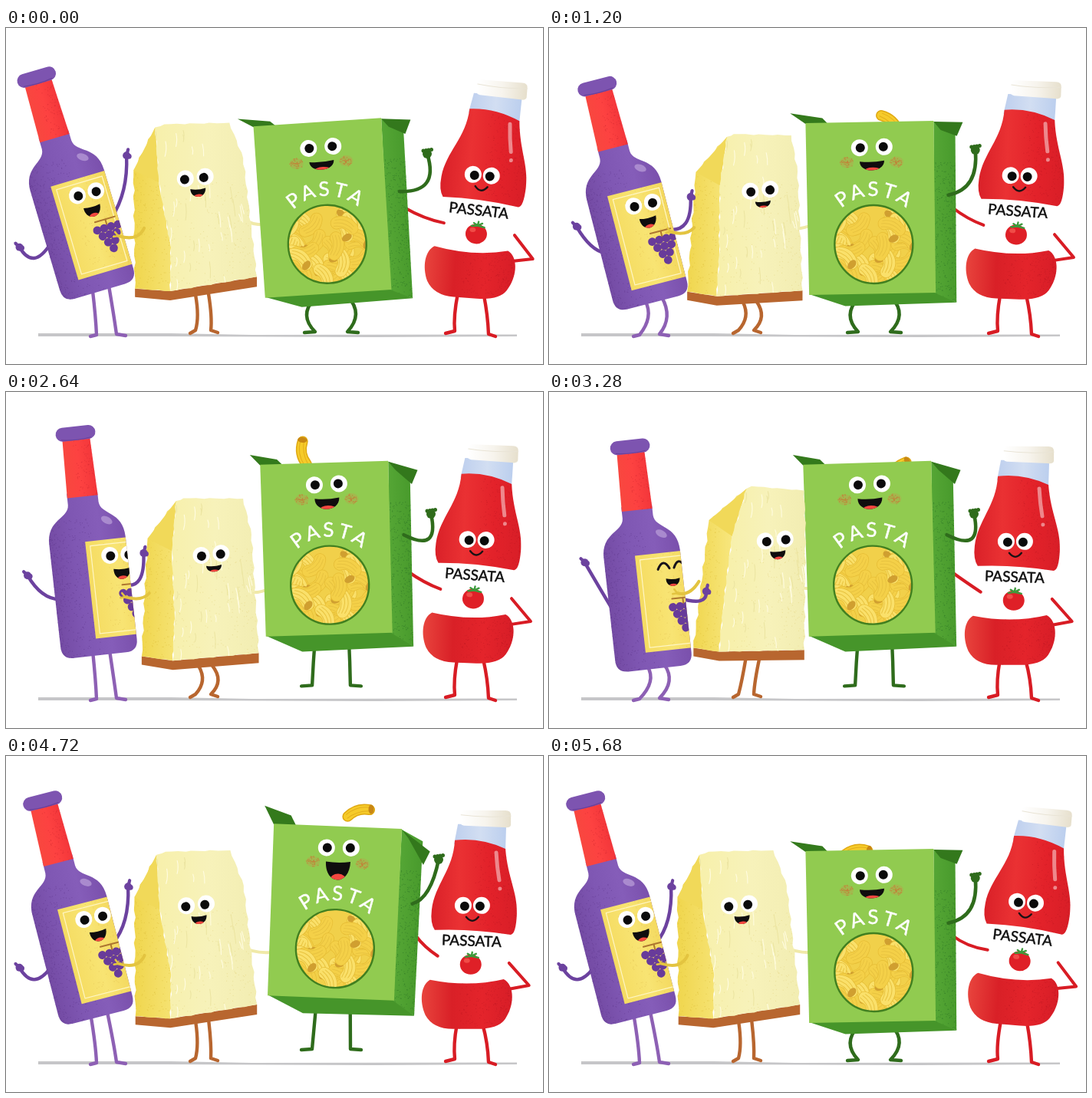
Write an HTML page with a canvas that moves like this. It is 700 by 438 pixels and loops after 5760 ms.

```html
<!DOCTYPE html>
<html lang="en">
<head>
<meta charset="utf-8">
<title>Dancing groceries</title>
<style>
html, body { margin: 0; width: 100%; height: 100%; overflow: hidden; background: #fff; }
canvas { display: block; width: 700px; height: 438px; }
</style>
</head>
<body>
<canvas id="stage" width="700" height="438"></canvas>
<script>
const ctx = document.getElementById('stage').getContext('2d');
const STEP = 80, STEPS = 72;

const rad = d => d * Math.PI / 180;
const lerp = (a, b, t) => a + (b - a) * t;
const clamp = t => Math.max(0, Math.min(1, t));
const smooth = t => t * t * (3 - 2 * t);
// Swings between -1 and 1, reaching 1 at step `peak`
const wave = (step, period, peak) => Math.cos(2 * Math.PI * (step - peak) / period);

function bottlePose(step) {
  const drift = wave(step, 12, 4.5), left = wave(step, 12, .5), right = wave(step, 12, -.2);
  const lean = ((1 - wave(step, 12, 1)) / 2) ** 1.3;
  return {
    x: 129 + 9 * drift,
    y: 350.5 + 10.5 * drift,
    tilt: -17 + 15.5 * lean,
    label: -13 - 14 * wave(step, 12, 1.5),
    laughing: wave(step, 12, 6.5) > .6,
    leftHand: [26 + 15 * wave(step, 12, 5.5), 242 + 38 * left],
    rightHand: [183 - 25 * right, 205 - 49 * right]
  };
}
function cheesePose(step) {
  return { sway: (1 - wave(step, 12, -.3)) / 2, dip: (1 + wave(step, 6, 2.4)) / 2 };
}
function boxPose(step) {
  const p = step % 8;
  const lift = 1 - smooth(clamp((Math.abs(p - 3.2) - 2.1) / 1.1));
  const tilt = p < 3 ? lerp(-3.4, 2.6, p / 3) : lerp(2.6, -.7, (p - 3) / 4);
  const x = 421.5 + 2.5 * tilt, handY = 147 + 17 * wave(p, 8, 0);
  return {
    x, y: 235 - 31 * lift, tilt, lift,
    mouth: 18 + 7 * wave(p, 8, 3.7),
    leftFlap: -130 - 7 * wave(p, 8, 4),
    rightFlap: -80 + 13 * wave(p, 8, 3.2),
    hand: [x + 136, handY],
    elbow: [557 + 9 * wave(p, 8, .5), handY + 51]
  };
}
function saucePose(step) {
  return {
    x: 602 + 2.2 * wave(step, 9, 8.2),
    y: 324.4 - 3.8 * wave(step, 9, 7.8),
    tilt: 1.9 + 2.9 * wave(step, 9, 8.2)
  };
}

function random(seed) {
  return () => (seed = (seed * 16807) % 2147483647) / 2147483647;
}
function place(x, y, deg, draw) {
  ctx.save();
  ctx.translate(x, y);
  ctx.rotate(rad(deg));
  draw();
  ctx.restore();
}
// Stage position of a point inside a tilted figure
function locate(p, x, y) {
  const c = Math.cos(rad(p.tilt)), s = Math.sin(rad(p.tilt));
  return [p.x + x * c - y * s, p.y + x * s + y * c];
}
function poly(points) {
  const path = new Path2D();
  points.forEach(p => path.lineTo(p[0], p[1]));
  path.closePath();
  return path;
}
function fill(path, color) { ctx.fillStyle = color; ctx.fill(path); }
function dot(x, y, r, color, ry = r, turn = 0) {
  ctx.fillStyle = color;
  ctx.beginPath();
  ctx.ellipse(x, y, r, ry, turn, 0, 7);
  ctx.fill();
}
function line(color, width, d) {
  ctx.strokeStyle = color;
  ctx.lineWidth = width;
  ctx.lineCap = ctx.lineJoin = 'round';
  ctx.stroke(new Path2D(d));
}
const bow = (a, c, b) => `M${a} Q${c} ${b}`;
function across(x0, x1, ...colors) {
  const g = ctx.createLinearGradient(x0, 0, x1, 0);
  colors.forEach((c, i) => g.addColorStop(i / (colors.length - 1), c));
  return g;
}
function inside(path, draw) {
  ctx.save();
  ctx.clip(path);
  draw();
  ctx.restore();
}
// Speckled shading, densest at x0
function grain(path, color, x0, x1, y0, y1, count) {
  const rnd = random(77);
  inside(path, () => {
    ctx.fillStyle = color;
    for (let i = 0; i < count; i++) {
      ctx.fillRect(lerp(x0, x1, rnd() ** 2), lerp(y0, y1, rnd()), 1, 1);
    }
  });
}
function eye(x, y, dx = 0, dy = 0) {
  dot(x, y, 11, '#fff');
  dot(x + dx, y + dy, 6, '#0b0b0b');
}
function mouth(x, y, w, h, deg = 0) {
  place(x, y, deg, () => {
    const r = w / 2;
    const path = new Path2D(`M${-r} 0 Q0 2 ${r} -1 C${r} ${h * 1.3} ${-r} ${h * 1.3} ${-r} 0Z`);
    fill(path, '#0f0d0e');
    inside(path, () => dot(1, h, w * .34, '#f4473f', h * .36));
  });
}
function leg(color, hip, knee, ankle, toe) {
  line(color, 4.4, `${bow(hip, knee, ankle)} L${toe}`);
}
function lettering(text, size, color, x, y) {
  ctx.font = `${size}px Lato, sans-serif`;
  ctx.textAlign = 'center';
  ctx.textBaseline = 'middle';
  ctx.fillStyle = ctx.strokeStyle = color;
  ctx.lineWidth = .5;
  ctx.fillText(text, x, y);
  ctx.strokeText(text, x, y);
}

function drawGround() {
  fill(new Path2D('M42 398 L215 398 L320 400 L666 399.5 V402 L480 403 L210 402 L42 402Z'), '#c6c6c8');
}

function drawSauce(p, box) {
  const red = '#d81c24';
  const at = (x, y) => locate(p, x - 600, y - 327);
  line(red, 4, bow([box.x + 106, 234], [545, 249], at(562, 262)));
  leg(red, at(587, 352), [583, 376], [585, 395], [573, 398]);
  leg(red, at(621, 352), [628, 374], [629, 399], [638, 402]);
  line(red, 4, `M${at(655, 271)} L${at(681, 300)} L${at(654, 305)}`);

  place(p.x, p.y, p.tilt, () => {
    ctx.translate(-600, -327);
    fill(new Path2D('M588 90 H651 L650 124 L583 116Z'), across(585, 650, '#bfd0ee', '#d2def2', '#bccfee'));
    const body = new Path2D('M584 111 Q617 107 650 122 C653 160 666 178 665 207 Q664 233 657 234 ' +
      'Q606 226 558 228 Q552 219 554 202 C558 168 582 150 584 111Z');
    fill(body, across(552, 666, '#d92028', '#ea3133', '#e3222a', '#d81e27'));
    grain(body, '#a9142055', 666, 610, 115, 235, 350);
    const base = new Path2D('M552 293 Q603 303 648 292 C662 299 663 325 650 344 Q641 357 612 357 H582 ' +
      'Q556 357 546 339 C538 321 540 300 552 293Z');
    fill(base, across(541, 660, '#e8443d', '#d92027', '#e4242b', '#d71d27'));
    grain(base, '#a9142055', 660, 590, 295, 357, 280);
    line('#ffffff77', 5, 'M638 127 Q639 146 642 163');
    dot(643, 174, 2.5, '#ffffff77');
    const cap = new Path2D('M591 76 Q592 72 598 72 L650 72 Q657 72 657 78 V91 Q656 95 649 94 ' +
      'L596 92 Q590 91 591 86Z');
    fill(cap, across(592, 657, '#ffffff', '#f7f4ed', '#e6dfcc'));
    line('#e9e4d6', 1, 'M592 78 Q625 82 657 79');
    eye(595, 196, 2, 1);
    eye(619, 196, -2, 1);
    line('#181214', 2.4, 'M599 211 Q607 221 615 211');
    place(606, 243, 2, () => lettering('PASSATA', 19, '#111', 0, 0));
    dot(605, 273, 14, '#df2027', 13);
    dot(600, 268, 4, '#f04c47', 3);
    line('#3c9a3c', 2.4, 'M598 263 L606 262 L615 264 M601 259 L606 262 L612 259 M606 262 L607 257');
  });
}

// One piece pops out per jump, alternating between the left and right of the box
function drawToss(step) {
  const p = step % 8, left = step % 16 < 8;
  if (!p) return;
  const x = left ? 384 + 2.3 * p : 459 - (p - 3.4) ** 2;
  const y = left ? 58 + 4.5 * (p - 3.2) ** 2 : 70 + 4.5 * (p - 3.6) ** 2;
  place(x, y, 15 * p - (left ? 115 : 62), () => {
    const arc = 'M-15 3 Q0 -5 15 3';
    line('#dfa812', 14, arc);
    line('#f6cb2a', 11, arc);
    line('#e3ad1c', 1, 'M-16 0 Q0 -7 16 0 M-16 5 Q0 -1 16 5');
    dot(17, 3, 3.5, '#c88714', 6, .3);
  });
}

function drawWindow() {
  const path = new Path2D();
  path.arc(3, 47, 51, 0, 7);
  fill(path, '#f1d04a');
  const rnd = random(41);
  inside(path, () => {
    for (let i = 0; i < 42; i++) {
      place(-48 + rnd() * 102, -4 + rnd() * 102, rnd() * 180, () => {
        line('#e6bd35', 16, 'M-10 2 Q0 -6 12 2');
        line(i % 2 ? '#fae06a' : '#f4d048', 14.5, 'M-10 2 Q0 -6 12 2');
        line('#e8c340', 1, 'M-13 -1 Q0 -9 13 -1 M-13 3 Q0 -4 13 3 M-12 7 Q0 1 13 7');
        if (i % 3 == 0) dot(13, 3, 4.5, '#d09f30', 7);
      });
    }
  });
  ctx.strokeStyle = '#417f20';
  ctx.lineWidth = 2.4;
  ctx.stroke(path);
}

function drawBox(p) {
  const dark = '#2f6c1c', low = 6 * p.lift;
  for (const side of [-1, 1]) {
    const hip = locate(p, side < 0 ? -18 : 26, 117);
    const ankle = [424 + side * (21 + 4 * p.lift), 396 - 14 * p.lift];
    const knee = [(hip[0] + ankle[0]) / 2 + side * 21 * (1 - p.lift), (hip[1] + ankle[1]) / 2];
    leg(dark, hip, knee, ankle, [ankle[0] + side * 14, ankle[1] + 1]);
  }
  place(p.x, p.y, p.tilt, () => {
    const tip = p.leftFlap;
    fill(poly([[-84, -111], [-104 + 7 * p.lift, tip], [-62, -110 + (tip + 110) * .55], [-55, -111]]), '#347a1c');
    const under = poly([[-82, 111], [-35, 127 + low], [110, 124 + low], [83, 109]]);
    fill(under, '#46952a');
    const side = poly([[83, -112], [111, -98], [110, 124 + low], [81, 111]]);
    fill(side, across(82, 112, '#55a635', '#489a2c'));
    grain(side, '#2e7526aa', 113, 82, -60, 130, 500);
    fill(poly([[83, -112], [121, p.rightFlap - 18], [113, p.rightFlap], [92, -101]]), '#33781c');
    fill(poly([[-84, -112], [83, -113], [83, 111], [-82, 112]]), '#91cb50');
    const rnd = random(9), up = 5 * p.lift;
    for (const x of [-31, 34]) {
      dot(x, -60 - up, 9, '#c6964c55', 7);
      for (let i = 0; i < 45; i++) {
        const a = rnd() * 7, r = rnd() * 9;
        dot(x + r * Math.cos(a), -60 - up + r * Math.sin(a) * .8, .7, '#c0853a');
      }
    }
    eye(-14, -79 - up, 1, 0);
    eye(18, -80 - up, -1, 0);
    mouth(2, -61 - up, 32, p.mouth);
    drawWindow();
    [...'PASTA'].forEach((letter, i) =>
      place(3, 47, (i - 2) * 17.2, () => lettering(letter, 26, '#fff', 0, -71)));
  });
  const [x, y] = p.hand;
  line(dark, 4.6, bow(locate(p, 101, -16), p.elbow, p.hand));
  dot(x, y, 6, dark);
  for (let i = 0; i < 4; i++) dot(x - 5 + i * 3.5, y - 4 - i * .5, 2.5, dark);
}

// Polygon whose long edges wobble slightly
function crumbly(points) {
  const out = [];
  points.forEach((a, i) => {
    const b = points[(i + 1) % points.length];
    const n = Math.ceil(Math.hypot(b[0] - a[0], b[1] - a[1]) / 9);
    for (let k = 0; k < n; k++) {
      const w = k ? Math.sin(k * 2.3 + i) * 1.2 : 0;
      out.push([lerp(a[0], b[0], k / n) + w, lerp(a[1], b[1], k / n) + w / 2]);
    }
  });
  return poly(out);
}

function drawCheese({ sway, dip }) {
  const rind = '#b8662f';
  // Corner given leaning left and leaning right, plus how far it sinks
  const v = (x0, y0, x1, y1, drop) => [lerp(x0, x1, sway), lerp(y0, y1, sway) + dip * drop];
  const top = v(194, 128, 260, 125, 17), crown = v(206, 124, 266, 122, 17);
  const corner = v(291, 122, 334, 128, 16), shoulder = v(309, 168, 335, 178, 15);
  const right = v(327, 323, 333, 336, 13), seam = v(214, 342, 222, 338, 11);
  const left = v(168, 339, 189, 333, 9), outer = v(166, 184, 210, 166, 16);
  const waist = v(199, 200, 240, 187, 14), low = v(215, 285, 227, 285, 12);
  const down = (pt, d) => [pt[0], pt[1] + d];

  leg(rind, v(247, 347, 257, 346, 12), [251 + dip * 13, 377], [247, 394], [240, 398]);
  leg(rind, v(264, 346, 275, 345, 12), [267 + dip * 20, 377], [267, 394], [276, 397]);

  fill(poly([left, seam, right, down(right, 13), down(seam, 12), down(left, 11)]), rind);
  const side = crumbly([top, outer, left, seam, low, waist]);
  fill(side, across(left[0], seam[0] + 15, '#f0d64e', '#f7e67c'));
  grain(side, '#dcbb3688', left[0] - 4, seam[0], 120, 360, 350);
  fill(poly([top, outer, waist]), '#f1d959');
  const front = crumbly([top, crown, corner, shoulder, right, seam, low, waist]);
  fill(front, across(waist[0], right[0], '#f7f0ac', '#f7f2ba', '#f2edb2'));
  grain(front, '#e3d37c88', right[0], waist[0], 200, 350, 250);
  const rnd = random(23);
  inside(front, () => {
    for (let i = 0; i < 40; i++) {
      const u = rnd(), t = rnd(), len = 8 + rnd() * 14;
      const x = lerp(lerp(top[0], seam[0], t), lerp(corner[0], right[0], t), u);
      const y = lerp(top[1], seam[1], t);
      line(i % 3 ? '#fffce0' : '#ece5a2', 1.1, `M${x} ${y} q2 ${len / 2} ${(u - .3) * 5} ${len}`);
    }
  });

  const face = v(247, 199, 297, 198, 21), look = lerp(-1, 2, sway);
  place(face[0], face[1], -6, () => {
    eye(-13, -6, look, 1);
    eye(13, -6, look - 1, 1);
    mouth(2, 9, 20, 11 - dip * 3, 4);
  });
}

function pointingHand([x, y], dx, dy, color) {
  dot(x + dx, y + dy, 5, color);
  dot(x + dx + 3, y + dy + 1, 3.5, color);
  line(color, 4.2, `M${x + 1} ${y + 2} L${x + dx} ${y + dy}`);
}

function drawBottle(p) {
  const limb = '#6c429f', legs = '#8d60b4';
  const at = (x, y) => locate(p, x, y);
  const bend = Math.max(0, p.y - 344);
  leg(legs, at(-9, -4), [117 + bend * 1.4, 377], [118, 400], [110, 402]);
  leg(legs, at(13, -4), [141 + bend * 1.5, 377], [144, 399], [156, 401]);

  const l = p.leftHand, r = p.rightHand;
  line(limb, 4.4, bow([l[0] + 6, l[1] + 7], [l[0] + 24, l[1] + 38], at(-44, -78)));
  pointingHand(l, 6, 7, limb);
  line(limb, 4.4, bow(at(42, -88), [r[0] + 1, Math.min(r[1] + 58, 280)], [r[0] - 1, r[1] + 10]));
  pointingHand(r, -1, 10, limb);

  place(p.x, p.y, p.tilt, () => {
    const body = new Path2D('M-20 -214 H20 V-199 C21 -181 50 -184 50 -150 V-16 Q50 0 34 0 H-34 ' +
      'Q-50 0 -50 -16 V-150 C-50 -184 -21 -181 -20 -199Z');
    fill(body, across(-50, 50, '#744ba4', '#7f57b3', '#855db9', '#7a50ac'));
    grain(body, '#58338577', -51, 5, -180, 0, 500);
    const neck = poly([[-18, -284], [18, -284], [20, -208], [-20, -208]]);
    fill(neck, across(-20, 20, '#f8473f', '#fd4241', '#f3363a'));
    grain(neck, '#c9242e77', 20, -5, -284, -208, 130);
    const cap = new Path2D();
    cap.roundRect(-26, -300, 52, 18, 9);
    fill(cap, '#7d54b0');
    line('#6b409a', 1.2, 'M-19 -284 Q0 -281 19 -284');
    dot(28, -174, 8, '#c5abe099', 4.5, .6);

    inside(body, () => {
      ctx.translate(p.label, 0);
      const label = poly([[0, -149], [74, -149], [74, -22], [0, -22]]);
      fill(label, across(0, 74, '#f5dc62', '#f8e473', '#f3d75c'));
      grain(label, '#dab64a77', 74, 20, -149, -22, 180);
      line('#fff6c4', 1.2, 'M6 -143 H68 V-28 H6Z');
      if (p.laughing) {
        line('#17121a', 3, 'M28 -128 Q36 -143 43 -128 M49 -128 Q56 -143 63 -128');
        mouth(46, -114, 18, 10, 6);
      } else {
        eye(30, -128, 1, 1);
        eye(55, -127, 0, 1);
        mouth(44, -109, 22, 14, 4);
      }
      line('#ad7630', 2, 'M42 -88 H69 M56 -88 V-80');
      for (let row = 0; row < 4; row++) {
        for (let i = 0; i < 4 - row; i++) {
          dot(56 + (i - (3 - row) / 2) * 9.4, -77 + row * 9.4, 5.4, '#683b9a');
        }
      }
    });
  });
}

function drawCheeseArm({ sway, dip }) {
  const a = [lerp(180, 196, sway), lerp(260, 246, sway) + dip * 9];
  const b = [lerp(146, 168, sway), lerp(271, 262, sway)];
  line('#e3c440', 4, bow(a, [lerp(172, 184, sway), lerp(279, 266, sway)], b));
  line('#e3c440', 2.6, `M${b} l-4 -5 M${b} l-6 1`);
}

function draw(step) {
  ctx.fillStyle = '#fff';
  ctx.fillRect(0, 0, 700, 438);
  const box = boxPose(step), cheese = cheesePose(step);
  drawGround();
  drawSauce(saucePose(step), box);
  const armY = 248 + cheese.dip * 10;
  line('#f0e9a8', 4, bow([308, armY], [322, armY + 9], [345, 256]));
  drawToss(step);
  drawBox(box);
  drawCheese(cheese);
  drawBottle(bottlePose(step));
  drawCheeseArm(cheese);
}

const start = performance.now();
function frame() {
  draw(Math.floor((performance.now() - start) / STEP) % STEPS);
  requestAnimationFrame(frame);
}
frame();
</script>
</body>
</html>
```
